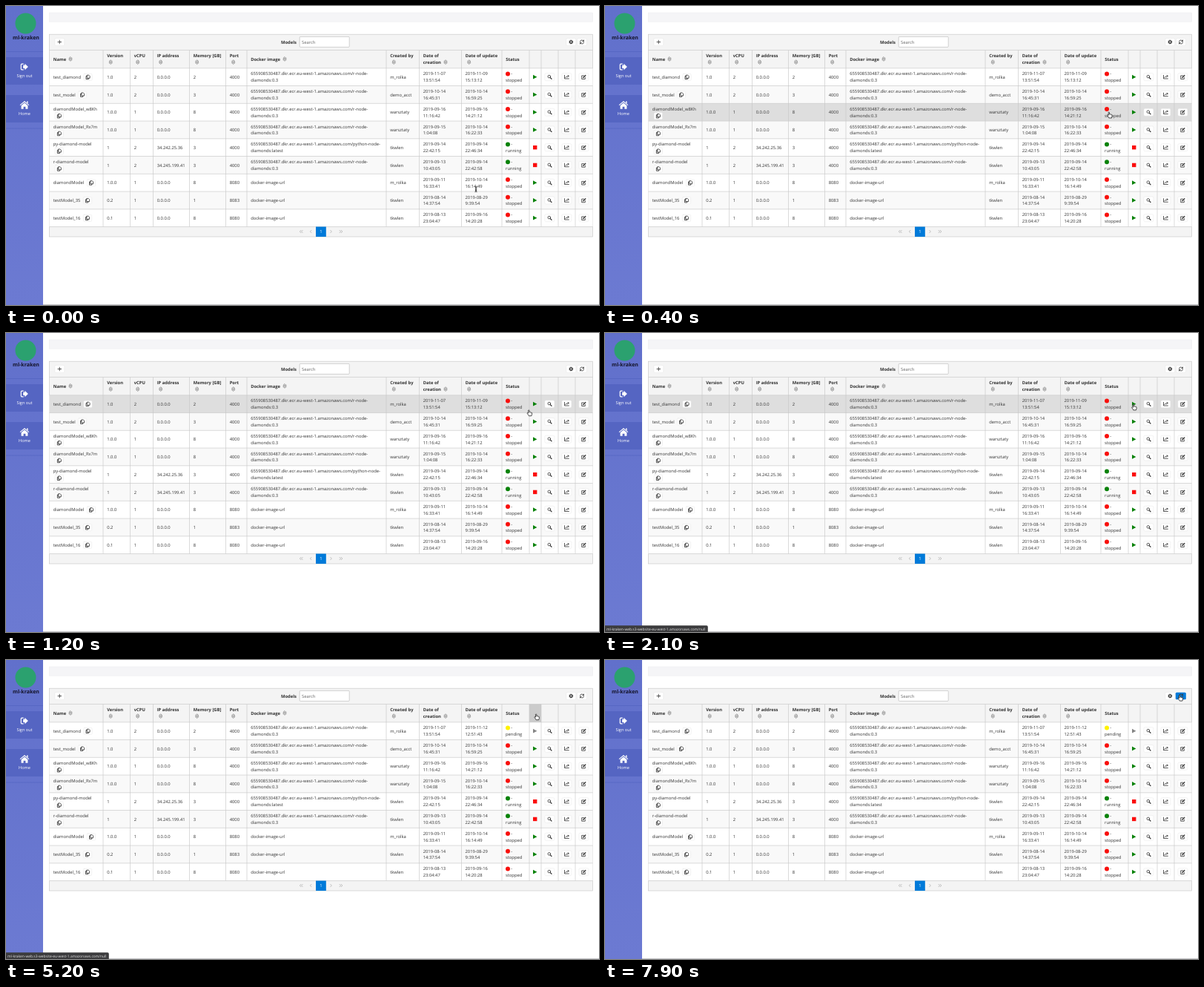
These frames come from a looping animation (800 by 403 pixels, 8000 ms). An HTML page:

```html
<!DOCTYPE html>
<html lang="en">
<head>
<meta charset="utf-8">
<title>Models</title>
<style>
html, body { margin: 0; width: 100%; height: 100%; overflow: hidden; background: #fff; }
svg { display: block; width: 800px; height: 403px; font: 5.83px "Open Sans", sans-serif; fill: #333; text-rendering: geometricPrecision; }
.b { font-weight: 700; }
.mid { text-anchor: middle; }
.line { fill: none; stroke: #333; stroke-width: .8; stroke-linejoin: round; stroke-linecap: round; }
.grid { fill: none; stroke: #c8c8c8; stroke-width: .65; }
.btn { fill: #fff; stroke: #e0e0e0; stroke-width: .4; }
</style>
</head>
<body>
<svg id="stage" viewBox="0 0 800 403">
  <defs>
    <linearGradient id="side" x2="0" y2="1">
      <stop offset="0" stop-color="#6170cb"/><stop offset="1" stop-color="#6c7ad2"/>
    </linearGradient>
    <g id="sort" fill="none" stroke="#555" stroke-width=".55" stroke-linejoin="round">
      <path d="M-2.2-.7L0-2.9 2.2-.7zM-2.2.7L0 2.9 2.2.7z"/>
    </g>
    <g id="copy" class="line">
      <rect class="btn" x="-5.7" y="-4.6" width="11.4" height="9.2" rx="1.5"/>
      <path d="M-.9-2.7h2.2l1.3 1.3v2.8h-3.5zM-1-1.4h-1.5v4.2h3.3v-1.3"/>
    </g>
    <rect id="box" class="btn" x="-6.5" y="-5" width="13" height="10" rx="1.7"/>
    <g id="find" class="line"><circle cx="-.6" cy="-.6" r="1.8"/><path stroke-width="1.2" d="M.9.9L2.6 2.6"/></g>
    <path id="chart" class="line" d="M-2.9-2.3v4.6h5.9M-1.6.9L-.2-.7.9.3 2.5-1.7M1.3-1.8h1.3v1.3"/>
    <g id="edit" class="line">
      <path d="M.3-1.8h-3v4.6h4.6V.5"/><path stroke-width="1.3" d="M-.7.9L2.4-2.2"/>
    </g>
    <g id="gear">
      <circle r="1.7" fill="none" stroke="#333" stroke-width="1.3"/>
      <circle r="2.5" fill="none" stroke="#333" stroke-width=".9" stroke-dasharray=".98"/>
    </g>
    <path id="reload" class="line" d="M-2.5-.4A2.5 2.5 0 0 1 2-1.5M2.5-2.6v1.7H.8M2.5.4A2.5 2.5 0 0 1-2 1.5M-2.5 2.6V.9H-.8"/>
  </defs>

  <rect width="800" height="403" fill="#fff"/>
  <rect width="50" height="403" fill="url(#side)"/>
  <path fill="#5565c2" d="M0 69h50v37H0zM0 120h50v37H0z"/>
  <path stroke="#5565c2" stroke-width=".8" d="M0 61.5h50M0 165h50"/>
  <circle cx="26.5" cy="23.5" r="14" fill="#2ba16f"/>
  <text class="b mid" x="27" y="45.3" font-size="7" fill="#15152b">ml-kraken</text>
  <g fill="#fff" class="mid">
    <path d="M23.2 79.8h2.2v-2l4.5 4.2-4.5 4.2v-2.2h-2.2z"/>
    <path d="M23.7 78.2h-2.4q-1 0-1 1v5.6q0 1 1 1h2.4" fill="none" stroke="#fff" stroke-width="1.2"/>
    <text x="25" y="95.8" font-size="5.6">Sign out</text>
    <path d="M25 128l6.3 5.3-.7.8-5.6-4.7-5.6 4.7-.7-.8zM25 130.6l4.4 3.7v4.5h-3v-3h-2.8v3h-3v-4.5zM28 128.6h1.6v3L28 130z"/>
    <text x="25" y="147" font-size="5.6">Home</text>
  </g>
  <rect x="58.3" y="9" width="733.5" height="12.3" fill="#f5f5f7" stroke="#e9e9ec" stroke-width=".4"/>
  <path stroke="#b9b9bd" stroke-width=".8" d="M50 402.5h750"/>

  <rect x="58.5" y="38.2" width="733" height="45.6" fill="#f4f4f4"/>
  <rect x="58.5" y="297.5" width="733" height="13.5" fill="#f4f4f4"/>
  <rect class="grid" x="58.5" y="38.2" width="733" height="272.8"/>
  <text class="b" x="371" y="50.6">Models</text>
  <rect x="396.2" y="41.4" width="67" height="14" rx="1" fill="#fff" stroke="#a6a6a6" stroke-width=".5"/>
  <text x="399" y="50.6" fill="#666">Search</text>
  <use href="#box" x="72.3" y="48.5"/>
  <path class="line" stroke-width="1" d="M70 48.5h4.6M72.3 46.2v4.6"/>
  <use href="#box" x="762.3" y="48.5"/><use href="#gear" x="762.3" y="48.5"/>
  <use href="#box" x="777" y="48.5"/>
  <rect id="press" x="769.8" y="43.8" width="14" height="9.4" rx="1.5" fill="#007ad9"/>
  <use href="#reload" x="777" y="48.5"/>

  <g id="table"></g>

  <rect x="418" y="297.5" width="13.8" height="13.5" fill="#007ad9"/>
  <text class="mid" x="425" y="306.2" fill="#fff">1</text>
  <path class="line" style="stroke:#aaa;stroke-width:.7" d="M398 302.3l-1.7 1.7 1.7 1.7M400.2 302.3l-1.7 1.7 1.7 1.7M412 302.3l-1.7 1.7 1.7 1.7M437.7 302.3l1.7 1.7-1.7 1.7M450 302.3l1.7 1.7-1.7 1.7M452.2 302.3l1.7 1.7-1.7 1.7"/>

  <g id="link">
    <path fill="#3b3b3d" d="M0 394.2h137q1.8 0 1.8 1.8v7H0z"/>
    <text x="2" y="400.7" font-size="4.92" fill="#e4e4e4">ml-kraken-web.s3-website-eu-west-1.amazonaws.com/null</text>
  </g>
  <g id="cursor" stroke-linejoin="round">
    <path id="beam" fill="none" stroke="#222" stroke-width=".8" d="M-1.5-3.6Q0-3.6 0-2.6V2.6Q0 3.6-1.5 3.6M1.5-3.6Q0-3.6 0-2.6V2.6Q0 3.6 1.5 3.6M-1 1.3h2"/>
    <path id="arrow" fill="#111" stroke="#fff" stroke-width=".6" d="M-2.2-3.8v7l1.6-1.5 1.1 2.4 1.2-.5-1.1-2.4h2.2z"/>
    <path id="hand" fill="#fff" stroke="#111" stroke-width=".75" d="M-1.9-3.2q.1-.8.7-.8t.7.8l.2 2.3q.5-.6 1.1.1.7-.5 1.1.2.9-.3 1.1.6.4 1.7-.6 3.9h-3.6q-.6-1.5-2-3.1-.5-.8.2-1.1.6-.2 1.4.6z"/>
  </g>
</svg>
<script>
const $ = id => document.getElementById(id);
const TOP = 83.8, STEP = 23.75, HEAD = 59.5, END = 297.5;
const cols = [58.5, 131, 167.5, 198.5, 247.5, 296.5, 325, 513, 557.5, 614.5, 669, 706, 722, 745, 768, 791.5];
const text = (x, y, s, extra = '') => `<text x="${x}" y="${y}" ${extra}>${s}</text>`;
const use = (id, x, y) => `<use href="#${id}" x="${x}" y="${y}"/>`;
const rect = (x, y, w, h, extra) => `<rect x="${x}" y="${y}" width="${w}" height="${h}" ${extra}/>`;

const ecr = '655908530487.dkr.ecr.eu-west-1.amazonaws.com/';
const rNode = ecr + 'r-node-|diamonds:0.3', pyNode = ecr + 'python-node-|diamonds:latest', plain = 'docker-image-url';
// name, copy button x (0: own line), version, vCPU, IP, memory, port, image, author, created, updated, running
const models = [
  ['test_diamond', 110.5, '1.0', 2, '0.0.0.0', 2, 4000, rNode, 'm_rolka', '2019-11-07|13:51:54', '2019-11-09|15:13:12'],
  ['test_model', 103, '1.0', 2, '0.0.0.0', 3, 4000, rNode, 'demo_acct', '2019-10-14|16:45:31', '2019-10-14|16:59:25'],
  ['diamondModel_w8Kh', 0, '1.0.0', 1, '0.0.0.0', 8, 4000, rNode, 'warsztaty', '2019-09-16|11:16:42', '2019-09-16|14:21:12'],
  ['diamondModel_Rx7m', 0, '1.0.0', 1, '0.0.0.0', 8, 4000, rNode, 'warsztaty', '2019-09-15|1:04:08', '2019-10-14|16:22:33'],
  ['py-diamond-model', 0, '1', 2, '34.242.25.36', 3, 4000, pyNode, 'tkwlen', '2019-09-14|22:42:15', '2019-09-14|22:46:34', 1],
  ['r-diamond-model', 0, '1', 2, '34.245.199.41', 3, 4000, rNode, 'tkwlen', '2019-09-13|10:43:05', '2019-09-14|22:42:58', 1],
  ['diamondModel', 115, '1.0.0', 1, '0.0.0.0', 8, 8080, plain, 'm_rolka', '2019-09-11|16:33:41', '2019-10-14|16:14:49'],
  ['testModel_35', 110, '0.2', 1, '0.0.0.0', 1, 8083, plain, 'tkwlen', '2019-08-14|14:37:54', '2019-08-29|9:39:54'],
  ['testModel_16', 110, '0.1', 1, '0.0.0.0', 8, 8080, plain, 'tkwlen', '2019-08-13|23:04:47', '2019-09-16|14:20:28']
];

// One or two lines centred on cy
function cell(x, cy, value, extra) {
  const lines = String(value).split('|');
  return lines.map((s, i) => text(x, cy + 2.1 + (i - (lines.length - 1) / 2) * 8.6, s, extra)).join('');
}

function status(cy, color, word) {
  return `<circle cx="677" cy="${cy - 4.3}" r="3" fill="${color}"/>` +
    text(681.3, cy - 2.2, '-') + text(674, cy + 6.4, word);
}

const play = (cy, color) => `<path fill="${color}" d="M711 ${cy - 2.9}l5.4 2.9-5.4 2.9z"/>`;

function header() {
  const names = ['Name', 'Version', 'vCPU', 'IP address', 'Memory [GB]', 'Port', 'Docker image', 'Created by', 'Date of|creation', 'Date of update', 'Status'];
  const inline = { 0: 87, 6: 376, 10: 0 };
  return names.map((name, i) => {
    const x = cols[i] + 5.2;
    if (i in inline) return cell(x, 71.5, name, 'class="b"') + (inline[i] ? use('sort', inline[i], 71.4) : '');
    const label = i === 8 ? cell(x, 71.5, name, 'class="b"') : text(x, 69.3, name, 'class="b"');
    return label + use('sort', i === 8 ? 593 : x + 5, 75.6);
  }).join('');
}

function row(m, i) {
  const cy = TOP + STEP * (i + .5), [name, copyX] = m, running = m[11];
  let out = copyX ? cell(63.8, cy, name) + use('copy', copyX, cy + .2)
                  : text(63.8, cy - 2.2, name) + use('copy', 71.8, cy + 5);
  for (let c = 1; c < 9; c++) out += cell(cols[c] + 5.2, cy, m[c + 1]);
  const live = cell(619.5, cy, m[10]) +
    (running ? status(cy, '#0a820a', 'running') : status(cy, '#f8100c', 'stopped')) +
    (running ? rect(711, cy - 2.7, 5.4, 5.4, 'fill="#fb0d0d"') : play(cy, '#0a820a'));
  out += i ? live : `<g id="idle">${live}</g><g id="pending">` +
    cell(619.5, cy, '2019-11-12|12:51:43') + status(cy, '#fff200', 'pending') + play(cy, '#858585') + '</g>';
  ['find', 'chart', 'edit'].forEach((icon, k) => {
    const x = 733.4 + 23 * k;
    out += use('box', x, cy) + use(icon, x, cy);
  });
  return out;
}

let grid = '';
cols.slice(1, -1).forEach(x => grid += `M${x} ${HEAD}V${END}`);
[HEAD, ...Array.from({ length: 10 }, (_, i) => TOP + STEP * i)].forEach(y => grid += `M58.5 ${y}H791.5`);

$('table').innerHTML =
  models.map((_, i) => rect(58.5, TOP + STEP * i, 733, STEP, `fill="${i % 2 ? '#f9f9f9' : '#fff'}"`)).join('') +
  rect(0, 0, 0, 0, 'id="hover"') + `<path class="grid" d="${grid}"/>` + header() + models.map(row).join('');

// Pointer path: time, x, y
const path = [
  [0, 634, 247], [100, 664, 190], [200, 682.6, 156.2], [400, 681, 147], [700, 676.5, 135.5], [900, 679, 130],
  [1000, 686, 123], [1200, 706.5, 107.8], [1400, 712, 102], [1600, 714, 100], [4900, 714, 100],
  [5000, 714.5, 94], [5200, 716.3, 76.8], [5400, 721, 62], [5600, 732, 52], [5800, 740, 48],
  [6100, 741.5, 48], [6500, 741.5, 48], [6700, 763, 49.5], [6900, 776.5, 51.2], [8000, 776.5, 51.2]
];
const clamp = v => Math.min(1, Math.max(0, v));

function pointer(t) {
  const i = path.findIndex(p => p[0] > t), [t0, x0, y0] = path[i - 1], [t1, x1, y1] = path[i];
  const k = (t - t0) / (t1 - t0);
  return [x0 + (x1 - x0) * k, y0 + (y1 - y0) * k];
}

const show = (id, on) => $(id).style.display = on ? '' : 'none';

function place(x, y, w, h, fill) {
  Object.entries({ x, y, width: w, height: h, fill }).forEach(([k, v]) => $('hover').setAttribute(k, v));
}

function draw(t) {
  const [x, y] = pointer(t), hot = y - .8;
  $('cursor').setAttribute('transform', `translate(${x} ${y})`);
  const beam = t < 100, arrow = t >= 5500 && t < 6800;
  show('beam', beam);
  show('arrow', arrow);
  show('hand', !beam && !arrow);

  if (beam || hot < HEAD) place(0, 0, 0, 0, 'none');
  else if (hot < TOP) {
    const c = cols.findIndex(v => v > x);
    place(cols[c - 1], HEAD, cols[c] - cols[c - 1], TOP - HEAD, '#cbcbcb');
  } else place(58.5, TOP + STEP * Math.floor((hot - TOP) / STEP), 733, STEP, '#dedede');

  show('idle', t < 3700);
  show('pending', t >= 3700);
  show('press', t >= 7900);
  $('link').style.opacity = Math.min(clamp((t - 1800) / 300), clamp((5700 - t) / 300));
}

function tick() {
  draw(Math.floor(performance.now() % 8000 / 100) * 100);
  requestAnimationFrame(tick);
}
tick();
</script>
</body>
</html>
```
